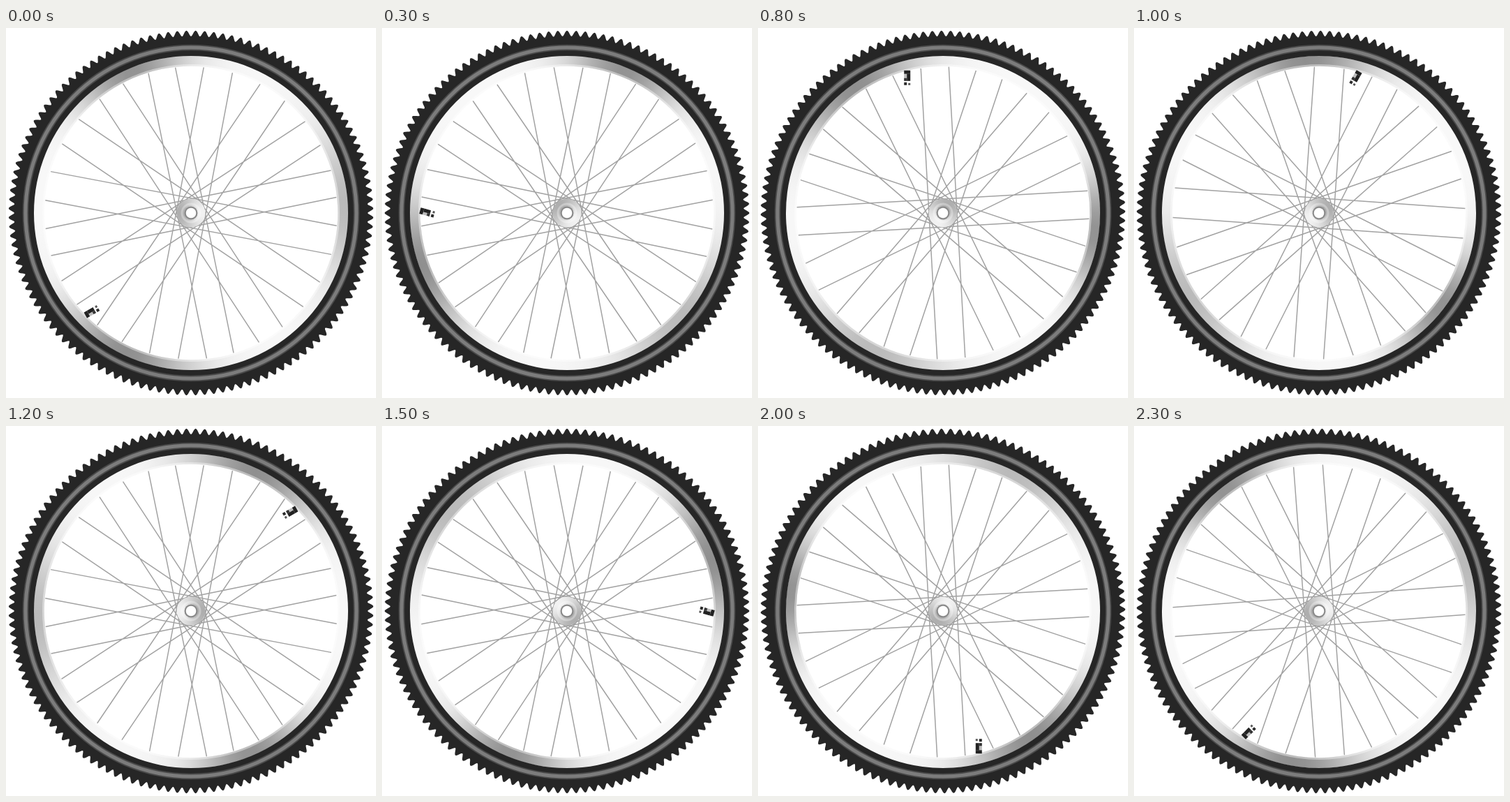
Animation, 530 px wide and 530 px high, one loop 2.4 s. Source, as an HTML page with a canvas:

```html
<!DOCTYPE html>
<html lang="en">
<head>
<meta charset="utf-8">
<title>Bicycle wheel</title>
<style>
html, body { margin: 0; width: 100%; height: 100%; overflow: hidden; background: #fff; }
canvas { display: block; width: 530px; height: 530px; }
</style>
</head>
<body>
<canvas id="stage" width="530" height="530"></canvas>
<script>
const ctx = document.getElementById('stage').getContext('2d');
const TAU = Math.PI * 2;
const RAD = Math.PI / 180;
const STEPS = 24;
const STEP_MS = 100;
const START = 135 * RAD;
const KNOBS = 124;
const AXES = 16;
const SPOKE_R = 209.5;
const FLANGE_R = 20.5;
const RIM_R = 225;

// All angles are in the wheel's own frame, where the valve sits at 0.
function dip(a, centre, depth, width) {
  const d = (a - centre + 540) % 360 - 180;
  return depth * Math.exp(-((d / width) ** 2));
}

function rimGrey(a) {
  return 248 - dip(a, -20, 105, 25) - dip(a, 112, 102, 21) - dip(a, 222, 62, 27);
}

function hubGrey(a) {
  return 208 - 34 * Math.cos((a - 45) * RAD);
}

function sweep(grey) {
  const g = ctx.createConicGradient(0, 0, 0);
  for (let a = 0; a <= 360; a += 5) {
    const v = Math.round(grey(a));
    g.addColorStop(a / 360, `rgb(${v},${v},${v})`);
  }
  return g;
}

function ring(r, width, style) {
  ctx.beginPath();
  ctx.arc(0, 0, r, 0, TAU);
  ctx.lineWidth = width;
  ctx.strokeStyle = style;
  ctx.stroke();
}

function disc(r, style) {
  ctx.beginPath();
  ctx.arc(0, 0, r, 0, TAU);
  ctx.fillStyle = style;
  ctx.fill();
}

function box(style, x, y, w, h) {
  ctx.fillStyle = style;
  ctx.fillRect(x, y, w, h);
}

function treadPath() {
  const p = new Path2D();
  const points = KNOBS * 10;
  for (let i = 0; i < points; i++) {
    const a = i / points * TAU;
    const r = 253 + 8.3 * (0.5 + 0.5 * Math.cos(KNOBS * a)) ** 0.85;
    p.lineTo(r * Math.cos(a), r * Math.sin(a));
  }
  p.closePath();
  p.moveTo(RIM_R, 0);
  p.arc(0, 0, RIM_R, 0, TAU);
  return p;
}

// Each axis carries two collinear spokes that pass the hub at its flange;
// the rim holes are slightly uneven, four times around.
function spokePath() {
  const p = new Path2D();
  const lean = Math.asin(FLANGE_R / SPOKE_R);
  const hole = a => a + 0.65 * RAD * Math.cos(4 * (a - 4 * RAD));
  for (let i = 0; i < AXES; i++) {
    const axis = (i + 0.5) * TAU / AXES - START;
    const from = hole(axis + lean);
    const to = hole(axis + Math.PI - lean);
    p.moveTo(SPOKE_R * Math.cos(from), SPOKE_R * Math.sin(from));
    p.lineTo(SPOKE_R * Math.cos(to), SPOKE_R * Math.sin(to));
  }
  return p;
}

function valve() {
  ctx.save();
  ctx.translate(200, 0);
  ctx.rotate(15 * RAD);
  box('#222', 6, -4, 5, 9);
  box('#bbb', -4, -4, 10, 4);
  box('#222', -4, 0, 10, 5);
  box('#333', -4, -4, 4, 4);
  box('#2a2a2a', -10, -4, 4, 4);
  box('#555', -10, 2, 3, 3);
  ctx.restore();
}

const tread = treadPath();
const spokes = spokePath();
const rimFill = sweep(rimGrey);
const hubFill = sweep(hubGrey);

function wheel(angle) {
  ctx.setTransform(1, 0, 0, 1, 0, 0);
  box('#fff', 0, 0, 530, 530);
  ctx.translate(265, 265);
  ctx.rotate(angle);

  ring(217.75, 15, rimFill);
  ring(211.5, 3, 'rgba(255,255,255,0.4)');

  ctx.lineWidth = 1.5;
  ctx.strokeStyle = '#a2a2a2';
  ctx.stroke(spokes);
  valve();

  ctx.fillStyle = '#262626';
  ctx.fill(tread, 'evenodd');
  ring(237, 8.5, '#4a4a4a');
  ring(237, 5, '#7c7c7c');

  disc(20.5, hubFill);
  ring(13, 3, 'rgba(255,255,255,0.3)');
  disc(9.5, '#8a8a8a');
  disc(7.3, '#fff');
}

function frame() {
  const step = Math.floor(performance.now() / STEP_MS) % STEPS;
  wheel(START + step * TAU / STEPS);
  requestAnimationFrame(frame);
}
frame();
</script>
</body>
</html>
```
